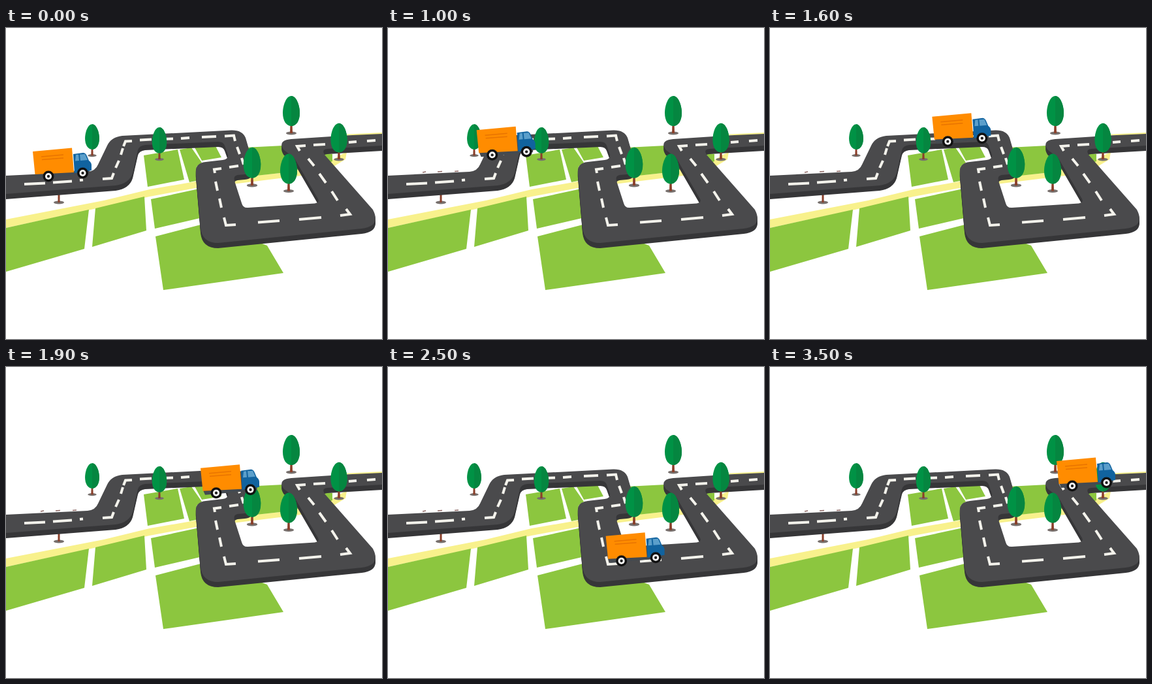
Animation of 576x476 px, one loop 3.6 s. Source, as an HTML page:

```html
<!DOCTYPE html>
<html lang="en">
<head>
<meta charset="utf-8">
<title>Delivery truck on a winding road</title>
<style>
html, body { margin: 0; width: 100%; height: 100%; overflow: hidden; background: #fff; }
svg { display: block; }
</style>
</head>
<body>
<svg width="576" height="476" viewBox="0 0 576 476">
  <defs>
    <path id="road" d="M0 226 L125 220 Q137 219 141 209 L155 180 Q161 167 178 165 L345 156.500 Q362 156 367 168
      L378 206 Q383 222 366 224 L355 225 Q348 226 350 234 L361 268 Q363 276 371 275 L473 268.500 Q482 267 477 260
      L441 198 L426 187 Q415 172 437 170 L520 164.500 L576 162 V180 L492 185 Q483 186 488 194 L562 278 Q575 303 545 307
      L325 329 Q300 329 298 305 L291 222 Q289 207 306 205 L332 202 Q341 201 340 194 L335 180 Q333 174 325 174
      L213 179 Q204 180 202 187 L194 222 Q189 238 168 241 L0 254 Z"/>
    <g id="tree">
      <ellipse cy="46" rx="8" ry="2.500" fill="#77706d"/>
      <path d="M-1.500 30 H1.500 L2 46 H-2 Z" fill="#8a3f2a"/>
      <path id="crown" d="M0 -11 C8 -11 13 4 13 15 C13 28 7 35 0 35 C-7 35 -13 28 -13 15 C-13 4 -8 -11 0 -11 Z" fill="#009245"/>
      <path d="M0 -11 C8 -11 13 4 13 15 C13 28 7 35 0 35 Z" fill="#058640"/>
    </g>
    <g id="wheel">
      <circle r="8.500" fill="#111"/>
      <circle r="5" fill="#fff"/>
      <circle r="2.200" fill="#222"/>
    </g>
  </defs>

  <path fill="#f8f18c" d="M0 293 L150 264 L220 247 L290 235 L420 222 L493 206 L515 193 L522 190 L520 201 L500 213 L460 225 L355 238 L290 245 L220 258 L130 278 L0 306 Z
    M515 163 L576 160 V164 H515 Z"/>
  <path fill="#8cc63f" d="M0 306 L127 278 L120 338 L0 373 Z M137 276 L212 258 L215 310 L132 335 Z
    M222 262 L310 243 V288 L228 307 Z M229 319 L310 298 L400 333 L425 375 L241 401 Z
    M211 195 L263 186 L273 232 L217 243 Z M266 186 L284 183 L300 206 L292 212 L291 234 L281 236 Z
    M289 183 L320 179 L330 198 L300 203 Z M365 183 L425 180 L445 200 L458 215 L420 222 L365 228 Z
    M484 191 L500 193 V204 L493 207 Z"/>

  <ellipse cx="81" cy="267" rx="8" ry="2.500" fill="#77706d"/>
  <path d="M81 255 V267" stroke="#8a3f2a" stroke-width="3"/>
  <g id="side" fill="#363638"></g>
  <use href="#road" fill="#4a4a4c"/>
  <path d="M53 221 l5 -1 M76 220 l7 -.5 M102 219.500 l6 -.5" stroke="#8d6865" stroke-width="1.500"/>
  <path fill="none" stroke="#f4f3ec" stroke-width="4" d="M28 239 L60 237.500 M72 236.500 L101 234.500 M113 233 L118 232.500
    M148 231 L162 230 L165 222 M168 214 L173 203 M176 194 L179 184 M180 181 L183 173.500 L193 173
    M205 171.500 L223 170.500 M240 170 L256 169.500 M268 169 L281 168 M300 167 L322 166
    M335 165.500 L349 164.500 L351 173 M354 182 L358 193 M361 199 L364 209 M356 211 L342 213
    M330 215 L319 216.500 L320 222 M321 235 L324 249 M327 261 L330 275 M334 290 L337 302 L352 301
    M386 297.500 L419 295 M449 293 L483 290 M512 287 L527 285 L521 277 M499 250 L508 264
    M480 223 L490 237 M463 200 L472 211 M450 188 L446 181 L459 180 M471 179 L489 178
    M525 175 L537 174 M553 173 L566 172"/>
  <g id="trees"></g>

  <g id="truck">
    <path d="M-20 -4 L63 -9 L62 -4 L-17 3 Z" fill="#444a50"/>
    <path d="M-24 -38 L36 -43.500 L39 -6 L-20.500 -3 Z" fill="#ff8c00"/>
    <path d="M-11 -30 L23 -33 M-10 -25.500 L23 -28" stroke="#e87400" stroke-width="1.500"/>
    <path d="M38 -34 L53 -36 Q57 -36 59 -31 L62 -24 Q66 -21 66 -17 V-9 L40 -5 Z" fill="#11639f"/>
    <path d="M42 -33 L46 -33.500 L47 -24 L41 -23.500 Z M48 -33.500 L56 -34 L60 -25 L49 -24 Z" fill="#5b9fcb"/>
    <use href="#wheel"/>
    <use href="#wheel" x="52.500" y="-5"/>
  </g>
</svg>
<script>
const byId = id => document.getElementById(id);

byId('side').innerHTML = [2, 4, 6, 8].map(y => `<use href="#road" y="${y}"/>`).join('');

// x, y and scale of each tree
byId('trees').innerHTML = [
  [132, 156.5, .84], [235, 161.5, .86], [437, 115, 1], [510, 156.5, .97], [377, 194, 1.02], [433, 203.5, 1]
].map(([x, y, s]) => `<use href="#tree" transform="translate(${x} ${y}) scale(${s})"/>`).join('');

// Step number and rear wheel position at each turn of the route
const route = [
  [0, 65, 227], [6, 125, 227], [12, 177, 178], [18, 320, 171.5],
  [24, 332, 299], [29, 460, 288], [34, 446, 198], [35, 463, 182]
];

function draw(now) {
  const step = Math.floor(now / 100) % 36;
  const next = Math.max(1, route.findIndex(p => p[0] >= step));
  const [s0, x0, y0] = route[next - 1], [s1, x1, y1] = route[next];
  const k = (step - s0) / (s1 - s0);
  byId('truck').setAttribute('transform', `translate(${x0 + (x1 - x0) * k} ${y0 + (y1 - y0) * k})`);
}

const start = performance.now();
function tick() {
  draw(performance.now() - start);
  requestAnimationFrame(tick);
}
tick();
</script>
</body>
</html>
```
